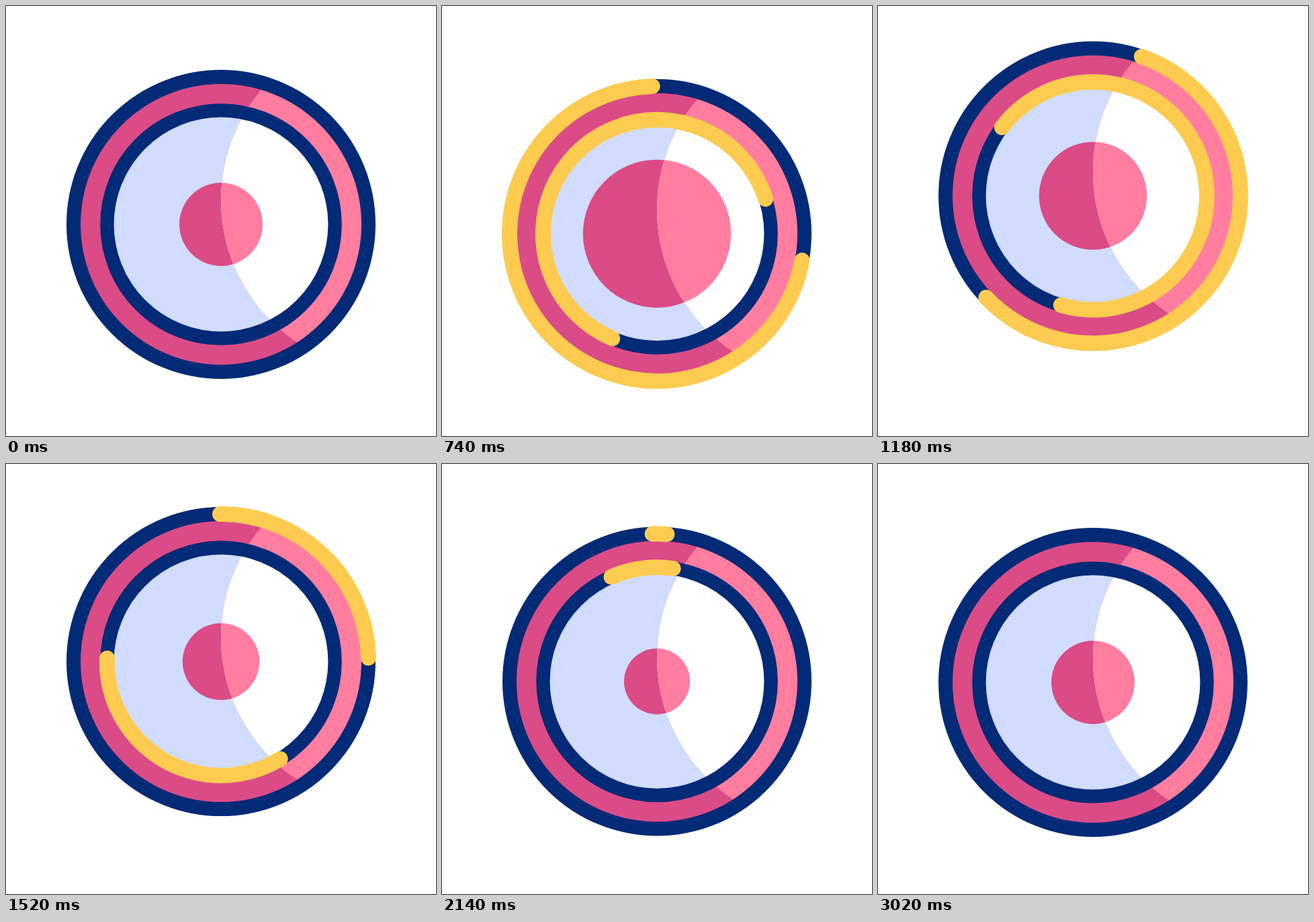
Write an HTML page with a canvas that moves like this. It is 640 px wide and 640 px high and loops after 3600 ms.

```html
<!DOCTYPE html>
<html lang="en">
<head>
<meta charset="utf-8">
<title>Ring loader</title>
<style>
  html, body { margin: 0; width: 100%; height: 100%; overflow: hidden; background: #fff; }
  canvas { display: block; width: 640px; height: 640px; }
</style>
</head>
<body>
<canvas id="stage" width="640" height="640"></canvas>
<script>
const ctx = document.getElementById('stage').getContext('2d');
const LOOP = 3600, STEP = 20, TAU = Math.PI * 2;
const NAVY = '#032a76', YELLOW = '#fdcb50';
const DARK = { ring: '#db4b86', disc: '#d1dcff' };
const LIGHT = { ring: '#ff7ea0', disc: '#ffffff' };
const OUTER = 219.5, INNER = 169.6;

// Cubic bezier easing, solved by bisection.
function bezier(x1, y1, x2, y2) {
  const at = (s, a, b) => 3 * (1 - s) * (1 - s) * s * a + 3 * (1 - s) * s * s * b + s * s * s;
  return x => {
    if (x <= 0) return 0;
    if (x >= 1) return 1;
    let lo = 0, hi = 1;
    for (let i = 0; i < 30; i++) {
      const mid = (lo + hi) / 2;
      if (at(mid, x1, x2) < x) lo = mid; else hi = mid;
    }
    return at(lo, y1, y2);
  };
}
const ease = bezier(0.167, 0.1, 0.2, 1);
const longEase = bezier(0.167, 0.1, 0.1, 1);

const sweep = (t, from, to, fn) => fn((t - from) / (to - from));

// Each stretch between two keys is eased on its own.
function eased(keys, t) {
  let value = keys[0][1];
  for (let i = 1; i < keys.length; i++) {
    const [t0, v0] = keys[i - 1], [t1, v1] = keys[i];
    if (t >= t0) value = v0 + (v1 - v0) * sweep(t, t0, t1, ease);
  }
  return value;
}

// One smooth curve through all keys, at rest at both ends.
function smooth(keys, t) {
  const last = keys.length - 1;
  if (t <= keys[0][0]) return keys[0][1];
  if (t >= keys[last][0]) return keys[last][1];
  const i = keys.findIndex(k => k[0] > t) - 1;
  const slope = n => n === 0 || n === last ? 0
    : (keys[n + 1][1] - keys[n - 1][1]) / (keys[n + 1][0] - keys[n - 1][0]);
  const [t0, v0] = keys[i], [t1, v1] = keys[i + 1];
  const d = t1 - t0, x = (t - t0) / d, y = 1 - x;
  return v0 * (1 + 2 * x) * y * y + v1 * x * x * (3 - 2 * x)
    + d * x * y * (slope(i) * y - slope(i + 1) * x);
}

const HEIGHT = [[180, 325], [643, 359], [1353, 280], [2400, 325]];
const DOT = [[293, 62], [895, 112], [2080, 48], [3060, 62]];
const SPIN = [[180, 0], [740, 22], [1180, 62], [1840, 151], [2520, 227], [2975, 254]];

function disc(r, color) {
  ctx.fillStyle = color;
  ctx.beginPath();
  ctx.arc(0, 0, r, 0, TAU);
  ctx.fill();
}

// Angles are clockwise degrees from the top.
function stroke(r, width, color, from = 0, to = 360) {
  if (to - from < 0.05) return;
  const rad = a => (a - 90) * TAU / 360;
  ctx.strokeStyle = color;
  ctx.lineWidth = width;
  ctx.lineCap = 'round';
  ctx.beginPath();
  ctx.arc(0, 0, r, rad(from), rad(to));
  ctx.stroke();
}

function body(tone, dot) {
  disc(OUTER, tone.ring);
  disc(INNER, tone.disc);
  disc(dot, tone.ring);
}

function draw(t) {
  ctx.setTransform(1, 0, 0, 1, 0, 0);
  ctx.fillStyle = '#fff';
  ctx.fillRect(0, 0, 640, 640);
  ctx.translate(320, eased(HEIGHT, t));

  const dot = eased(DOT, t);
  body(DARK, dot);
  ctx.save();
  ctx.beginPath();
  ctx.arc(255, -36, 255, 0, TAU);
  ctx.clip();
  body(LIGHT, dot);
  ctx.restore();

  stroke(OUTER, 21, NAVY);
  stroke(INNER, 20.4, NAVY);

  // The outer line runs anticlockwise, the inner one clockwise.
  const head = 360 * sweep(t, 180, 1650, ease);
  const tail = 360 * sweep(t, 910, 2400, ease);
  stroke(OUTER, 23, YELLOW, 358.2 - head, 358.2 - tail);

  const base = 181 + smooth(SPIN, t);
  const lead = 360 * sweep(t, 193, 2143, longEase);
  const trail = 360 * sweep(t, 995, 2975, longEase);
  stroke(INNER, 23, YELLOW, base + trail, base + lead);
}

const start = performance.now();
function tick() {
  const t = Math.max(0, performance.now() - start) % LOOP;
  draw(Math.floor(t / STEP) * STEP);
  requestAnimationFrame(tick);
}
tick();
</script>
</body>
</html>
```
